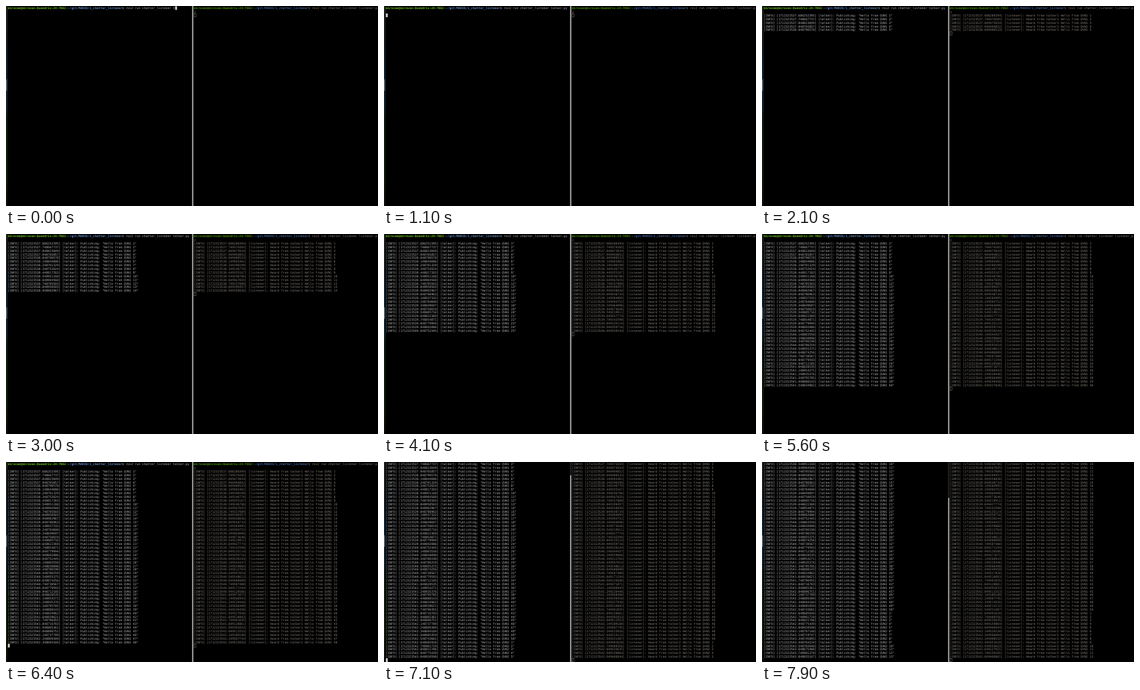
These frames come from a looping animation (600 px wide and 323 px high, 8 s). An HTML page:

```html
<!DOCTYPE html>
<html lang="en">
<head>
<meta charset="utf-8">
<title>Talker and listener</title>
<style>
  html, body { margin: 0; width: 100%; height: 100%; overflow: hidden; background: #000; }
  svg { display: block; width: 100%; height: 100%; }
  text {
    font: 4.87px "DejaVu Sans Mono", "Noto Sans Mono", monospace;
    white-space: pre;
    text-rendering: geometricPrecision;
  }
  .bold { font-weight: bold; }
  .left { fill: #b3b4b8; }
  .left .user { fill: #6cc41e; }
  .left .path { fill: #5f88bd; }
  .right { fill: #857f77; }
  .right .user { fill: #4a900e; }
  .right .path { fill: #3d6096; }
</style>
</head>
<body>
<svg id="stage" viewBox="0 0 600 323" preserveAspectRatio="none">
  <defs>
    <linearGradient id="desk" x1="0" y1="0" x2="0" y2="1">
      <stop offset="0" stop-color="#20231f"/>
      <stop offset=".2" stop-color="#171d22"/>
      <stop offset=".3" stop-color="#12222f"/>
      <stop offset=".5" stop-color="#14242f"/>
      <stop offset=".56" stop-color="#101c12"/>
      <stop offset=".85" stop-color="#131d0d"/>
      <stop offset="1" stop-color="#0b0f09"/>
    </linearGradient>
  </defs>
  <rect width="600" height="323"/>
  <rect width="2.6" height="323" fill="url(#desk)"/>
  <rect y="118.5" width="1.8" height="18.5" fill="#56626a"/>
</svg>
<script>
const LOOP = 8000, STEP = 100, FIRST_LINE = 1700;
const ROWS = 55, PITCH = 5.865, TOP = 0.4, BASELINE = 4.9, CELL = 2.932;
const LINES = 63, FIRST_BATCH = 50, HEADER_ROWS = 2;
const USER = "mirovan@mirovan-Quendrix-24-7062";
const PATH = "~/git/MARIO/1_chatter_listener";
const COMMAND = "$ ros2 run chatter_listener ";
const PROMPT_LENGTH = USER.length + 1 + PATH.length + COMMAND.length;
const stage = document.getElementById("stage");

function add(parent, tag, attrs = {}, content = "") {
  const node = document.createElementNS("http://www.w3.org/2000/svg", tag);
  for (const key in attrs) node.setAttribute(key, attrs[key]);
  node.textContent = content;
  parent.appendChild(node);
  return node;
}

const rowTop = row => TOP + row * PITCH;

function noise(seed) {
  const value = Math.sin(seed * 12.9898) * 43758.5453;
  return value - Math.floor(value);
}

// Messages are sent every 100 ms, with a little jitter in the microseconds.
function stamp(n, side) {
  const total = n === 1 ? 686 : 548 + side + n * 100;
  const seconds = 1712323537 + Math.floor(total / 1000);
  const millis = String(total % 1000).padStart(3, "0");
  const jitter = n === 1 ? 252395 + side * 27999
    : Math.floor(side ? 120000 + noise(n + 90) * 480000 : 650000 + noise(n) * 310000);
  return `${seconds}.${millis}${String(jitter).padStart(6, "0")}`;
}

function message(n) {
  const batch = n > FIRST_BATCH ? 2 : 1;
  return { batch, hello: `Hello from QVN${batch} ${n - (batch - 1) * FIRST_BATCH}` };
}

function talkerLine(n) {
  return `[INFO] [${stamp(n, 0)}] [talker]: Publishing: "${message(n).hello}"`;
}

function listenerLine(n) {
  const { batch, hello } = message(n);
  return `[INFO] [${stamp(n, 1)}] [listener]: Heard from talker${batch} ${hello}`;
}

function makePane(name, x, lineText) {
  const group = add(stage, "g", { class: name });
  const addRow = (row, content) =>
    add(group, "text", { x, y: rowTop(row) + BASELINE }, content);
  const prompt = addRow(0, "");
  add(prompt, "tspan", { class: "user bold" }, USER);
  add(prompt, "tspan", {}, ":");
  add(prompt, "tspan", { class: "path bold" }, PATH);
  add(prompt, "tspan", {}, COMMAND);
  const file = add(prompt, "tspan");
  const lines = Array.from({ length: LINES }, (_, i) =>
    addRow(HEADER_ROWS + i, lineText(i + 1)));
  return { group, file, lines, addRow, x };
}

const left = makePane("left", 3, talkerLine);
const right = makePane("right", 303.2, listenerLine);
right.file.textContent = "listener.p";
right.addRow(1, "y");

const block = add(left.group, "rect", { width: CELL + 0.2, height: PITCH, fill: "#c8c8c8" });
const hollow = add(right.group, "rect", {
  x: right.x + 0.3, width: CELL + 0.1, height: PITCH - 0.6,
  fill: "none", stroke: "#77736d", "stroke-width": 0.6
});

add(stage, "rect", { x: 299.8, width: 3, height: 323, fill: "#1c1c1c" });
const thumb = add(stage, "rect", { x: 300, width: 2.2, fill: "#969696" });

function placeBlock(col, row) {
  block.setAttribute("x", left.x + col * CELL);
  block.setAttribute("y", rowTop(row));
}

function render(time) {
  const t = time % LOOP;
  const count = Math.max(0, Math.min(LINES, Math.floor((t - FIRST_LINE) / STEP) + 1));
  const cursorRow = HEADER_ROWS + count;
  const scroll = Math.max(0, cursorRow + 1 - ROWS);

  for (const pane of [left, right]) {
    pane.group.setAttribute("transform", `translate(0 ${-scroll * PITCH})`);
    pane.lines.forEach((line, i) =>
      line.setAttribute("visibility", i < count ? "visible" : "hidden"));
  }

  left.file.textContent = t < 100 ? "t" : "talker.py";
  if (t < 100) placeBlock(PROMPT_LENGTH + 1, 0);
  else if (t < 1100) placeBlock(1, 1);
  else placeBlock(0, cursorRow);
  const lit = t < 500 || Math.floor((t - 500) / 600) % 2 === 1;
  block.setAttribute("visibility", lit ? "visible" : "hidden");
  hollow.setAttribute("y", rowTop(cursorRow) + 0.3);

  // The thumb travels below a small inset once there is history to scroll.
  const inset = scroll ? 5 : 0;
  const thumbTop = inset + (323 - inset) * scroll / (ROWS + scroll);
  thumb.setAttribute("y", thumbTop);
  thumb.setAttribute("height", 323 - thumbTop);
}

const start = performance.now();
function tick() {
  render(performance.now() - start);
  requestAnimationFrame(tick);
}
tick();
</script>
</body>
</html>
```
